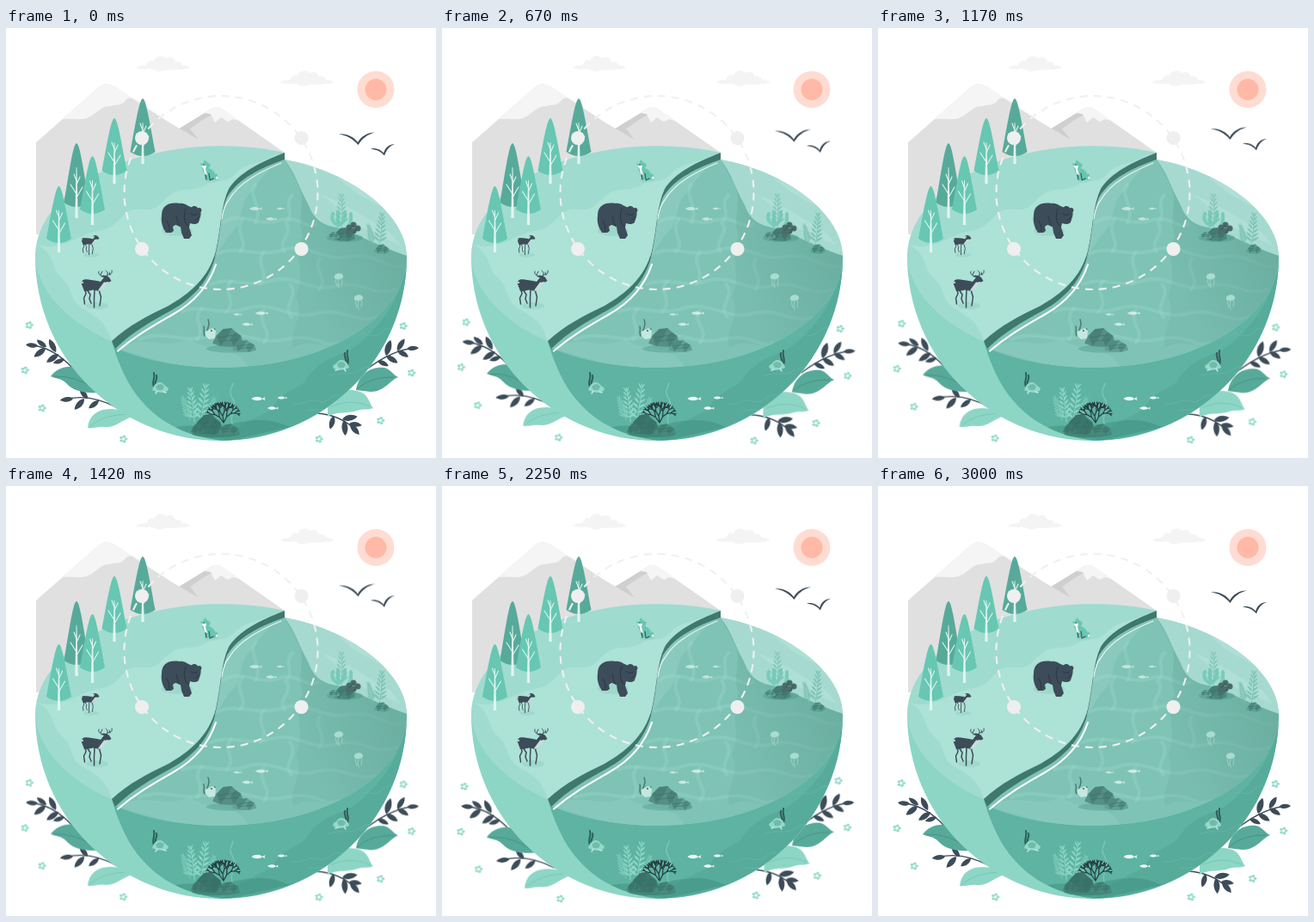
An HTML page for the animation above (3040 ms loop, 500 px wide and 500 px high).

```html
<!DOCTYPE html>
<html lang="en">
<head>
<meta charset="utf-8">
<title>Ecosystem</title>
<style>
html,body{margin:0;width:100%;height:100%;overflow:hidden;background:#fff}
svg{display:block;width:100vw;height:100vh}
#foliage{transform-origin:250px 412px}
</style>
</head>
<body>
<svg id="stage" viewBox="0 0 500 500" xmlns="http://www.w3.org/2000/svg"></svg>
<script>
const INK = '#3d4c59', MID = '#57aa9a', MINT = '#67c7b3', PALE = '#8dd6c6', DEEP = '#3f786d';

const path = (d, fill, more = '') => `<path d="${d}" fill="${fill}" ${more}/>`;
const line = (d, color, width = 1, more = '') =>
  `<path d="${d}" fill="none" stroke="${color}" stroke-width="${width}" stroke-linecap="round" stroke-linejoin="round" ${more}/>`;
const oval = (x, y, rx, ry, fill, more = '') =>
  `<ellipse cx="${x}" cy="${y}" rx="${rx}" ry="${ry}" fill="${fill}" ${more}/>`;
const dot = (x, y, r, fill) => oval(x, y, r, r, fill);
const group = (inner, more = '') => `<g ${more}>${inner}</g>`;
const place = (inner, x, y, sx = 1, sy = sx, turn = 0) =>
  group(inner, `transform="translate(${x} ${y}) rotate(${turn}) scale(${sx} ${sy})"`);

// Sky
const cloud = (x, y) => place(path(
  'M-31 5C-28 1-22 3-19 1C-18-4-13-5-11-3C-9-10 0-11 3-6C8-9 13-7 14-2C19-4 22 0 22 2C26 1 30 3 31 5C26 7 22 6 18 7C8 8 4 6-2 9C-9 10-10 6-16 6C-22 7-27 6-31 5Z', '#f4f4f4'), x, y);

const sky = cloud(183, 41.5) + cloud(350, 58.5) + dot(430, 71.5, 21.5, '#ffdcd2') + dot(430, 71.5, 12.5, '#ffb9a6');

const mountains =
  path('M198 119L239 94Q245 90 251 94L324 145V200H190Z', '#e0e0e0') +
  path('M198 119L239 94Q245 90 250 94L241 100L230 106L214 117L224 130Z', '#cfcfcf') +
  path('M231 99L240 93Q245 90 251 94L271 108L264 106L258 109L250 104L243 110L238 100Z', '#f5f5f5') +
  path('M35 133L108 69Q116 62 126 68L190 110L224 130L200 190L60 240H35Z', '#e0e0e0') +
  path('M66 106L108 69Q116 62 126 68L157 88C153 82 145 80 140 83C134 92 127 88 121 91C113 90 107 97 98 103C90 108 79 105 66 106Z', '#f5f5f5');

const birds =
  path('M387 123.500C396 122 405 127 409 133C413 126 420 121.500 429 121.500C420 123.500 414 129 409.500 136C402 127.500 396 125 387 123.500Z', INK) +
  path('M424 140.500C431 139 436 142 439 145.500C441 139 446 135 452 135C446 137 442 142 440 148.500C435 143 431 141.500 424 140.500Z', INK);

// Foliage around the bowl
const leaf = (x, y, turn, size) =>
  place(path('M0 0C.25 -.27 .7 -.27 1 0C.7 .24 .25 .24 0 0Z', INK), x, y, size, size, turn);
const branch = (stem, leaves) => line(stem, INK, 1.3) + leaves.map(l => leaf(...l)).join('');

const bloom = (x, y) => {
  let out = '';
  for (let i = 0; i < 5; i++) {
    const a = i * Math.PI * .4 - 1.3;
    out += oval(x + 3 * Math.cos(a), y + 3 * Math.sin(a), 1.9, 1.7, '#97dccc');
  }
  return out + dot(x, y, 1.2, '#fff');
};

const foliage =
  branch('M25 368.500Q53 369 78 396', [[37, 369.500, 185, 14], [47, 371, 217, 14], [58, 377, 243, 17], [46, 372, 142, 17], [61, 379, 145, 17], [68, 385, 160, 14]]) +
  branch('M64 433Q96 423 130 442', [[78, 431, 174, 15], [95, 431, 232, 15], [91, 431, 132, 17], [108, 433, 142, 15]]) +
  branch('M478 372Q450 373 418 398', [[466, 373, -4, 14], [455, 375, -58, 16], [442, 381, -74, 19], [455, 375, 30, 15], [442, 381, 32, 16], [432, 387, 25, 14]]) +
  branch('M360 448Q389 449 408 469', [[400, 461, 48, 16], [391, 455, -10, 18], [399, 460, 8, 15], [393, 456, 85, 18], [381, 451, 105, 16]]) +
  path('M52 405C61 393 79 389 94 401L108 424C88 425 77 421 70 413C64 407 58 408 52 405Z', MID) +
  line('M56 405Q82 404 103 420', '#438d80', .8) +
  path('M95 465C97 447 112 438 140 446L146 452C132 458 126 465 115 464C107 463 102 466 95 465Z', PALE) +
  line('M98 463Q112 450 140 449', '#70bfae', .7) +
  path('M407 421C410 402 425 393 440 395C446 396 450 403 456 406C447 409 440 423 424 423Z', MID) +
  line('M409 419Q425 405 451 406', '#438d80', .8) +
  path('M374 432C383 421 397 418 412 423C422 427 422 436 427 442C420 445 415 442 408 445C396 449 386 445 374 452Z', PALE) +
  line('M378 440Q402 430 423 440', '#70bfae', .7) +
  [[27, 345.500], [22, 398], [42, 442], [136.500, 478], [462, 346.500], [471.500, 401], [435.500, 456.500], [364, 478]].map(p => bloom(...p)).join('');

// Bowl
const shore = 'C296 156 271 168 259 187C250 205 250 232 244 259C236 291 213 309 189 323C164 335 144 345 123 364';
const beach = 'C147 353 168 342 191 329C217 315 236 294 243 267C250 240 249 217 257 197C270 175 298 162 324 153';
const land = `M34 266A216 129 0 0 1 324 145${shore}A216 129 0 0 1 34 266Z`;
const sea = `M127 372${beach}C400 167 466 216 466 266A216 129 0 0 1 127 372Z`;
const depth = 'M123 364C130 390 143 418 158 434C180 460 212 475 250 479.500A216 214 0 0 0 466 266A216 129 0 0 1 127 372Z';

const ripples = [
  'M252 226C275 212 292 232 316 224S350 236 362 228',
  'M247 262C270 252 292 268 322 258S365 272 398 266S440 282 464 276',
  'M238 298C262 288 280 303 308 294S352 308 384 300S425 314 454 304',
  'M205 330C228 320 250 336 280 326S330 340 360 332S410 345 430 336',
  'M155 362C185 350 205 368 238 358S290 370 326 362S370 374 385 366',
  'M290 182C280 196 300 208 290 226M333 194C322 206 336 216 326 226M275 222C264 238 284 248 272 260M325 226C336 240 314 248 324 260M300 260C288 274 308 284 296 298M365 268C356 282 376 290 364 304M262 294C250 306 270 318 256 330M330 298C342 312 320 322 332 336M228 326C214 338 234 350 222 362M300 328C290 342 312 352 300 366'
].map(d => line(d, '#a5dcd0', 4, 'opacity=".28"')).join('');

const floorEdge = 'C336 168 341 186 352 206C357 220 366 228 380 231C402 235 428 252 467 265';

const bowl =
  path('M34 266A216 214 0 0 0 466 266Z', PALE) +
  path(depth, '#5eb3a3') +
  group(
    path('M466 266C462 320 425 360 396 377C373 383 355 397 348 411C332 423 318 424 309 444C285 456 268 462 250 482L330 480L470 390Z', '#4c9f90', 'opacity=".42"') +
    path('M180 470C205 457 232 466 262 460S309 454 330 464L250 482Z', '#3f8f80', 'opacity=".5"') +
    line('M391 360C405 364 410 353 423 357S439 346 449 349M374 405C388 398 398 406 411 398S428 396 434 391M334 437C345 439 351 430 363 434S377 424 389 427M350 445C361 442 368 447 381 440', '#69b8aa', 1, 'opacity=".7"'), 'clip-path="url(#deep)"') +
  path(land, '#ade2d6') +
  group(
    path('M30 250C65 263 81 240 108 236C137 232 132 207 160 211C184 214 181 190 209 188C239 187 229 176 253 178C268 174 266 163 288 158L325 145L280 120L130 130L30 200Z', '#9edacd', 'opacity=".8"') +
    path('M30 250C58 258 52 280 64 290C80 302 72 318 92 328C108 338 116 342 123 364L50 340Z', '#9edacd', 'opacity=".8"'), 'clip-path="url(#land)"') +
  path(sea, '#7ec3b6') +
  group(
    path('M324 153C300 163 296 180 282 194C270 208 276 228 260 240L240 270L255 190Z', '#a5dacf', 'opacity=".3"') +
    ripples +
    path(`M324 153${floorEdge}L460 310L397 387C380 367 350 361 334 372C328 351 349 335 337 313C349 288 333 267 345 241C337 220 349 206 341 185Z`, 'url(#slope)') +
    path(`M324 153${floorEdge}L470 150Z`, '#abddd3', 'opacity=".9"') +
    path('M385 174L430 190L452 216L409 193ZM367 194C391 202 420 222 447 238L459 253L416 234Z', '#c1e7df', 'opacity=".35"') +
    path('M127 372C170 354 180 377 214 361C231 378 270 366 282 395L220 399Z', '#a5dacf', 'opacity=".22"'), 'clip-path="url(#sea)"') +
  path(`M324 145${shore}L127 373${beach}Z`, DEEP) +
  line('M130 375.500C150 358 170 347 194 333C219 319 236 299 244 275', '#fff', 2.2) +
  line('M251 222C252 214 254 206 259 200C271 179 298 166 320 157', '#e6f5f1', 1.2);

// Trees
const tree = (x, top, bottom, foot, fill) => {
  const h = bottom - top, w = 14.500;
  return path(`M${x} ${top}C${x + 4} ${top} ${x + 9} ${top + h * .5} ${x + w} ${bottom - 4}Q${x} ${bottom + 6} ${x - w} ${bottom - 4}C${x - 9} ${top + h * .5} ${x - 4} ${top} ${x} ${top}Z`, fill) +
    path(`M${x - .4} ${top + 28}L${x - 1.700} ${foot}H${x + 1.700}L${x + .4} ${top + 28}Z`, '#e1f5f0') +
    line(`M${x} ${bottom - 10}L${x + 7} ${bottom - 22}M${x} ${bottom - 14}L${x - 7} ${bottom - 25}M${x} ${bottom - 25}L${x + 4} ${bottom - 34}M${x} ${bottom - 29}L${x - 3} ${bottom - 37}`, '#e1f5f0', 1.1);
};
const trees =
  tree(159, 82, 148, 158, MID) + tree(126, 105, 170, 181, MINT) + tree(82, 134, 207, 221, MID) +
  tree(100.500, 149, 215, 229, MINT) + tree(61.500, 184, 249, 261, MINT);

// Land animals
const shadow = (x, y, rx, ry) => oval(x, y, rx, ry, '#8fd0c1', 'opacity=".5"');

const bear = shadow(199, 236, 18, 6) +
  path('M181 218C181 206 190 202 202 204C208 203 212 208 216 208.500C218 206 222 207 223 209.500C226 207.500 229 211 226.500 214C227 219 225 222 224 226C221 229 217 228 214 227L213 232L216 241L213 245H207L204 238L203 231L197 229L194 231L195 236L192 238H186L183 233C181 228 180 223 181 218Z', INK) +
  line('M209 210C206 218 207 227 212 231M198 219Q199 226 202 231M187 224Q191 230 190 236M215 216Q220 219 223 216M220 224L224 220', '#26333e', .8);

const deerBody =
  path('M88 298C87 291 94 292 99 293C104 294 108 294 110 295L114 290L110 289L113 287.500L117 288L120 290L122.500 294L120 295.500L117 295L114 302L109 306L101 304.500L95 306L91 306Z', INK) +
  line('M92 304L93 309L90.500 314L91.500 321M94 304L98 310L97 315L99 320M103 304L102.500 314V325M108 304L110.500 313L109 323', INK, 1.500) +
  path('M114 295.500L118 296L114 303L109 306L107 305Z', '#c7dedc') +
  dot(89, 296, 1.1, '#dbeeea');
const antlers = line('M114 289C109 288 107 286 108 283M110 287L112 283M117 289C119 285 118 284 116 282M118 287C122 287 124 285 123 282M121 287L120 284', INK, 1);
const fawn = place(deerBody, 35, 68.500, .6);

const fox = shadow(239, 177, 9, 2.5) +
  path('M228 163L226 157L229 158L231 153L234 156L238 159L236 163C242 165 245 170 242 176L237 176L232 177L230 169Z', MINT) +
  path('M227 160L233 160L232 164L234 171L231 171L230 164Z', '#fff') +
  path('M239 175C240 169 247 167 246 173Q245 177 239 177Z', MINT) +
  line('M232 170L233 176M236 169L237 176M241 175L237 177', INK, 1.1) +
  dot(230, 159, .7, INK) + dot(245, 174, 1.2, '#fff');

const animals = bear + shadow(106, 323, 13, 4) + deerBody + antlers + shadow(99, 264, 9, 2.500) + fawn + fox;

// Sea life
const fish = (x, y, size = 1, flip = 1, alpha = 1) => group(place(
  path('M-8 0C-4 -3 3 -3 5 0L9 -2L8 0L9 2L5 .5C2 3 -4 3 -8 0Z', '#eefaf7'), x, y, size * flip, size), `opacity="${alpha}"`);

const fern = (x, y, h, turn, color) => {
  let blades = '';
  for (let i = 1; i < 8; i++) {
    const at = -h * i / 8, w = h * .2 * (1.2 - i / 9);
    for (const side of [-1, 1]) blades += `M0 ${at}Q${side * w * .6} ${at - 1} ${side * w} ${at - 6}Q${side * w * .2} ${at - 5} 0 ${at}`;
  }
  return place(line(`M0 0Q2 ${-h / 2} 0 ${-h}`, color, 1) + path(blades, color), x, y, 1, 1, turn);
};

// Forked coral: each arm splits in two until it is short.
const fork = (x, y, a, size) => {
  if (size < 2.6) return '';
  const ex = x + Math.cos(a) * size, ey = y + Math.sin(a) * size;
  return `M${x.toFixed(1)} ${y.toFixed(1)}L${ex.toFixed(1)} ${ey.toFixed(1)}` +
    fork(ex, ey, a - .43, size * .76) + fork(ex, ey, a + .47, size * .76);
};
const coral = (x, y, size, color, width) =>
  line([-2.200, -1.7, -1.1].map(a => fork(x, y, a, size)).join(''), color, width);

const rock = (x, y, w, h, fill = '#4c877d') => place(
  path('M-1 .6L-.75 -.2L-.3 -.9L.25 -1L.5 -.6L.85 -.2L1 .65L.4 1L-.5 .9Z', fill) +
  path('M-.3 -.9L.25 -1L0 -.1L-.5 .9L-.75 -.2ZM.5 -.6L.85 -.2L.4 1L.15 .1Z', '#346d63', 'opacity=".38"'), x, y, w, h) +
  line(`M${x - w * .6} ${y}L${x + w * .5} ${y - h * .3}M${x - w * .5} ${y + h * .4}L${x + w * .7} ${y + h * .2}`, '#356b61', .5);

const jelly = (x, y) => group(
  path(`M${x - 5} ${y}C${x - 7} ${y - 7} ${x + 6} ${y - 8} ${x + 5} ${y - 1}Q${x} ${y + 3} ${x - 5} ${y}Z`, '#b9e5db') +
  line(`M${x - 3} ${y}q-2 4 1 9M${x} ${y + 1}q-2 5 0 10M${x + 3} ${y}q2 4 0 8`, '#b9e5db', .7), 'opacity=".8"');

const snail = (x, y, flip, weed) => place(
  line('M-7 1C-10 -5 -5 -8 -7 -15M-5 0C-7 -6 -2 -8 -4 -12', weed, 2) +
  path('M-8 2C-5 -5 2 -6 5 -1L10 3L9 6L3 8L-4 7L-9 5Z', '#94d8c9') +
  path('M-5 1Q1 -5 5 1L3 5L-3 5Z', '#72bbaa') + line('M-3 6L-5 9M4 7L7 8', '#bfe9df', 1.4), x, y, flip, 1);

const seaLife =
  fish(290, 210, .9, 1, .6) + fish(319, 210, .55, 1, .6) + fish(308, 222, .75, 1, .6) +
  fish(269, 333, .6, 1, .6) + fish(297, 331.500, .9, 1, .7) + fish(280.500, 344.500, .75, 1, .7) +
  oval(262, 373, 29, 4.500, '#569f92', 'opacity=".5"') +
  line('M236 359C230 350 239 348 235 339M231 358C228 352 232 352 230 347M239 355L243 350', '#4c7c74', 1.500) +
  path('M232 353L240 349L244 352L243 361L236 362L232 358Z', '#c4e8e0') + dot(239, 352, .9, INK) +
  rock(258, 360, 18, 11, '#568f85') + rock(277, 370, 14, 7, '#629f94') +
  fern(390, 232, 39, 0, '#86c8ba') +
  line('M386 229C377 225 379 219 380 216M386 230V214M387 229C395 225 394 218 394 214M399 230C402 225 401 220 401 216', '#70c8b6', 4, 'opacity=".85"') +
  oval(394, 244, 21, 5, '#549d90', 'opacity=".6"') + rock(393, 240, 13, 8) + rock(381, 241, 7, 4, '#6aa99d') +
  [[399, 232], [404, 229], [409, 233], [404, 236], [398, 237]].map(p => dot(...p, 3.500, '#496d6b')).join('') +
  line('M399 235L404 229M404 239L409 232', '#334f50', .8) +
  fern(434, 253, 38, 5, '#7fc3b4') + fern(427, 251, 22, -15, '#82c4b6') +
  rock(437, 257, 9, 5.500, '#5c9f93') + jelly(387, 291) + jelly(410, 316) +
  fish(293, 431, .95) + fish(321, 430, .65) + fish(310, 442, .75) +
  snail(179, 416, 1, '#2d5f58') + snail(390, 390, -1, '#345a58') +
  line('M263 460C259 449 270 442 264 432S262 421 264 413', '#78c5b4', 1.6) +
  fern(219, 458, 40, -7, PALE) + fern(226, 459, 46, 8, PALE) + fern(214, 456, 28, -18, '#7dcab9') + fern(233, 459, 30, 18, '#7dcab9') +
  coral(253, 459, 8, '#263d42', 1.2) +
  oval(244, 472, 28, 4, '#347568', 'opacity=".55"') + rock(235, 461, 17, 12, '#3b776c') + rock(259, 467, 13, 6.500, '#498a7e') + rock(223, 466, 8, 6, '#427e73');

// Cycle ring
const ring =
  '<circle cx="250" cy="191.500" r="112.500" fill="none" stroke="#f0f0f0" stroke-width="2.1" stroke-dasharray="9 7.070"/>' +
  [[158, 128], [343.500, 128], [158, 257], [343.500, 257]].map(p => dot(...p, 8, '#efefef')).join('');

const defs = `<defs>
  <clipPath id="land"><path d="${land}"/></clipPath>
  <clipPath id="sea"><path d="${sea}"/></clipPath>
  <clipPath id="deep"><path d="${depth}"/></clipPath>
  <linearGradient id="slope" x1=".9" y1=".2" x2=".15" y2=".65">
    <stop offset="0" stop-color="#62a698" stop-opacity=".75"/>
    <stop offset="1" stop-color="#62a698" stop-opacity=".2"/>
  </linearGradient>
</defs>`;

document.getElementById('stage').innerHTML = defs + sky + mountains +
  group(foliage, 'id="foliage"') + bowl + trees + animals + seaLife + ring + group(birds, 'id="birds"');

// Linear motion from [time, transform] steps
const LOOP = 3040;
const play = (id, steps) => {
  const motion = document.getElementById(id).animate(
    steps.map(([at, transform]) => ({ offset: at / LOOP, transform })),
    { duration: LOOP, iterations: Infinity, easing: 'linear' });
  motion.startTime = 0;
};
play('foliage', [[0, 'rotate(0deg)'], [750, 'rotate(1deg)'], [2250, 'rotate(-1deg)'], [3000, 'rotate(0deg)'], [LOOP, 'rotate(0deg)']]);
play('birds', [[0, 'translateY(0px)'], [1500, 'translateY(-8px)'], [3000, 'translateY(0px)'], [LOOP, 'translateY(0px)']]);
</script>
</body>
</html>
```
